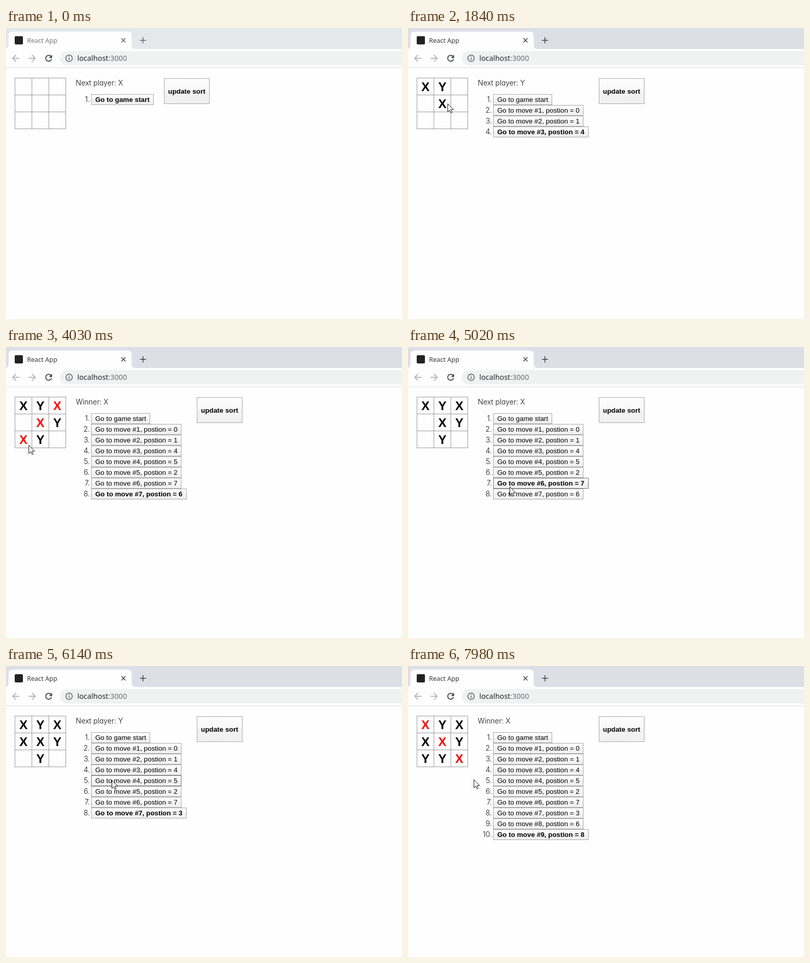
An HTML page for the animation above (8000 ms loop, 772 px wide and 567 px high).

```html
<!DOCTYPE html>
<html lang="en">
<head>
<meta charset="utf-8">
<title>React App</title>
<style>
  html, body { margin: 0; width: 100%; height: 100%; overflow: hidden; background: #fefefe; }
  svg { display: block; }
  text { white-space: pre; }
  .ui { font-family: "Noto Sans", "Open Sans", sans-serif; }
  .body { font: 300 14px Inter, Lato, sans-serif; font-feature-settings: "cv11"; fill: #111; }
  .btn { font: 13.333px "Liberation Sans", Arial, sans-serif; }
  .mark { font: bold 24px "Liberation Sans", Arial, sans-serif; text-anchor: middle; }
  .bold { font-weight: bold; }
  .line { fill: none; stroke-width: 2; }
  .thin { fill: none; stroke-width: 1.5; }
</style>
</head>
<body>
<svg width="772" height="567" viewBox="0 0 772 567">
  <defs>
    <linearGradient id="face" x2="0" y2="1">
      <stop offset="0" stop-color="#fdfdfd"/>
      <stop offset=".48" stop-color="#f8f8f8"/>
      <stop offset=".52" stop-color="#f2f2f2"/>
      <stop offset="1" stop-color="#f0f0f1"/>
    </linearGradient>
  </defs>
  <rect id="strip" width="772" height="41"/>
  <path d="M-3 41q8 0 8-8V15q0-8 8-8H237q8 0 8 8V33q0 8 8 8Z" fill="#fefefe"/>
  <rect x="17" y="16" width="16" height="16" rx="2" fill="#222"/>
  <text id="tab" class="ui" x="41" y="29" font-size="12.5">React App</text>
  <path id="tabIcons" class="thin" d="M225 20l8 8m0-8l-8 8M261 24h12m-6-6v12"/>
  <path class="line" stroke="#b8babd" d="M26 59H13m6.5-6.5L13 59l6.5 6.500M44 59h13m-6.500-6.500L57 59l-6.500 6.500"/>
  <path class="line" stroke="#4c4f53" d="M87.600 55.200a5.800 5.800 0 1 0 1.200 5.300"/>
  <path fill="#4c4f53" d="M90 52v6.500h-6.500Z"/>
  <path fill="#f0f2f2" d="M772 45H119a14 14 0 0 0 0 28H772Z"/>
  <circle class="thin" cx="123" cy="59" r="6.3" stroke="#5a5d61"/>
  <path class="thin" stroke="#5a5d61" d="M123 58v4.500m0-7.300v1.600"/>
  <text class="ui" x="139" y="64" font-size="14.3" fill="#232528">localhost<tspan fill="#6c6f73">:3000</tspan></text>
  <path d="M0 77.500H772" stroke="#dcdee0"/>
  <g id="game"></g>
  <path id="cursor" d="M.5 .5v16l3.700-3.500 2.500 5.500 2.300-1-2.400-5.500h5.100Z" fill="#fff" stroke="#111"/>
</svg>
<script>
const LOOP = 8000, PRESS = 190, CELL = 33, ROW = 21;
const $ = id => document.getElementById(id);
const lines = [0, 1, 2].flatMap(i => [[3 * i, 3 * i + 1, 3 * i + 2], [i, i + 3, i + 6]])
  .concat([[0, 4, 8], [2, 4, 6]]);

// The pointer goes from stop to stop; before a click it rests while pressing.
const via = (t, x, y) => ({ t, x, y, arrive: t });
const click = (t, x, y, act) => ({ t, x, y, act, arrive: t - PRESS });
const play = (t, n) => click(t, 32 + n % 3 * CELL, 115 + Math.floor(n / 3) * 32,
  g => ({ moves: [...g.moves.slice(0, g.step), n], step: g.step + 1 }));
const jump = (t, n) => click(t, 198, 139 + n * ROW, g => ({ ...g, step: n }));

const stops = [
  via(170, 740, 283), play(760, 0),
  via(980, 61, 132), play(1320, 1), play(1760, 4), play(2150, 5), play(2590, 2), play(3130, 7), play(3630, 6),
  via(4030, 44, 191), via(4210, 44, 191), via(4540, 196, 301), jump(4860, 6),
  via(5020, 198, 272), play(5770, 3),
  via(6140, 206, 222), via(6290, 200, 240), play(7020, 6), play(7770, 8),
  via(7980, 128, 221)
];

function pointer(t) {
  const next = stops.findIndex(s => s.t > t);
  if (next === 0) return null;
  const b = stops.at(next), a = next < 0 ? b : stops[next - 1];
  const u = Math.min(1, (t - a.t) / (b.arrive - a.t || 1));
  const k = u * u * (3 - 2 * u);
  return { x: Math.round(a.x + (b.x - a.x) * k), y: Math.round(a.y + (b.y - a.y) * k) };
}

const gameAt = t => stops.filter(s => s.act && s.t <= t)
  .reduce((g, s) => s.act(g), { moves: [], step: 0 });

const text = (cls, x, y, str, attrs = '') => `<text class="${cls}" x="${x}" y="${y}" ${attrs}>${str}</text>`;
const box = (x, y, w, h, fill, stroke) =>
  `<rect x="${x + .5}" y="${y + .5}" width="${w - 1}" height="${h - 1}" fill="${fill}" stroke="${stroke}"/>`;

function button(x, y, w, h, label, bold, pos) {
  const hover = pos && pos.x >= x && pos.x < x + w && pos.y >= y && pos.y < y + h;
  return box(x, y, w, h, 'url(#face)', hover ? '#707070' : '#a6a6a6') +
    text(bold ? 'btn bold' : 'btn', x + 8, Math.round(y + h / 2 + 4.5), label);
}

function draw({ moves, step }, pos) {
  const marks = Array(9).fill('');
  moves.slice(0, step).forEach((n, i) => marks[n] = 'XY'[i % 2]);
  const won = lines.find(([a, b, c]) => marks[a] && marks[a] === marks[b] && marks[a] === marks[c]);

  let out = marks.map((m, i) => {
    const x = 17 + i % 3 * CELL, y = 97 + Math.floor(i / 3) * CELL;
    return box(x, y, CELL + 1, CELL + 1, 'none', '#999') +
      text('mark', x + 17, y + 26, m, won?.includes(i) ? 'fill="#f00"' : '');
  }).join('');
  out += text('body', 136, 112, won ? 'Winner: ' + marks[won[0]] : 'Next player: ' + 'XY'[step % 2]);

  [null, ...moves].forEach((n, i) => {
    const y = 129 + i * ROW, bold = i === step;
    const label = i ? `Go to move #${i}, postion = ${n}` : 'Go to game start';
    const w = i ? (bold ? 186 : 176) : (bold ? 122 : 115);
    out += text('body', 163.5, y + 15, i + 1 + '.', 'text-anchor="end"') +
      button(166, y, w, ROW, label, bold, pos);
  });
  return out + button(moves.length ? 372 : 308, 98, 89, 50, 'update sort', true, pos);
}

let shown = '';
function frame(now) {
  const t = now % LOOP, pos = pointer(t), focused = t >= 620;
  const markup = draw(gameAt(t), pos);
  if (markup !== shown) $('game').innerHTML = shown = markup;

  $('strip').setAttribute('fill', focused ? '#dddfe7' : '#e4e8eb');
  $('tab').setAttribute('fill', focused ? '#36393d' : '#75787c');
  $('tabIcons').setAttribute('stroke', focused ? '#3c4043' : '#5f6368');
  $('cursor').setAttribute('visibility', pos ? 'visible' : 'hidden');
  if (pos) $('cursor').setAttribute('transform', `translate(${pos.x} ${pos.y})`);
  requestAnimationFrame(frame);
}
requestAnimationFrame(frame);
</script>
</body>
</html>
```
